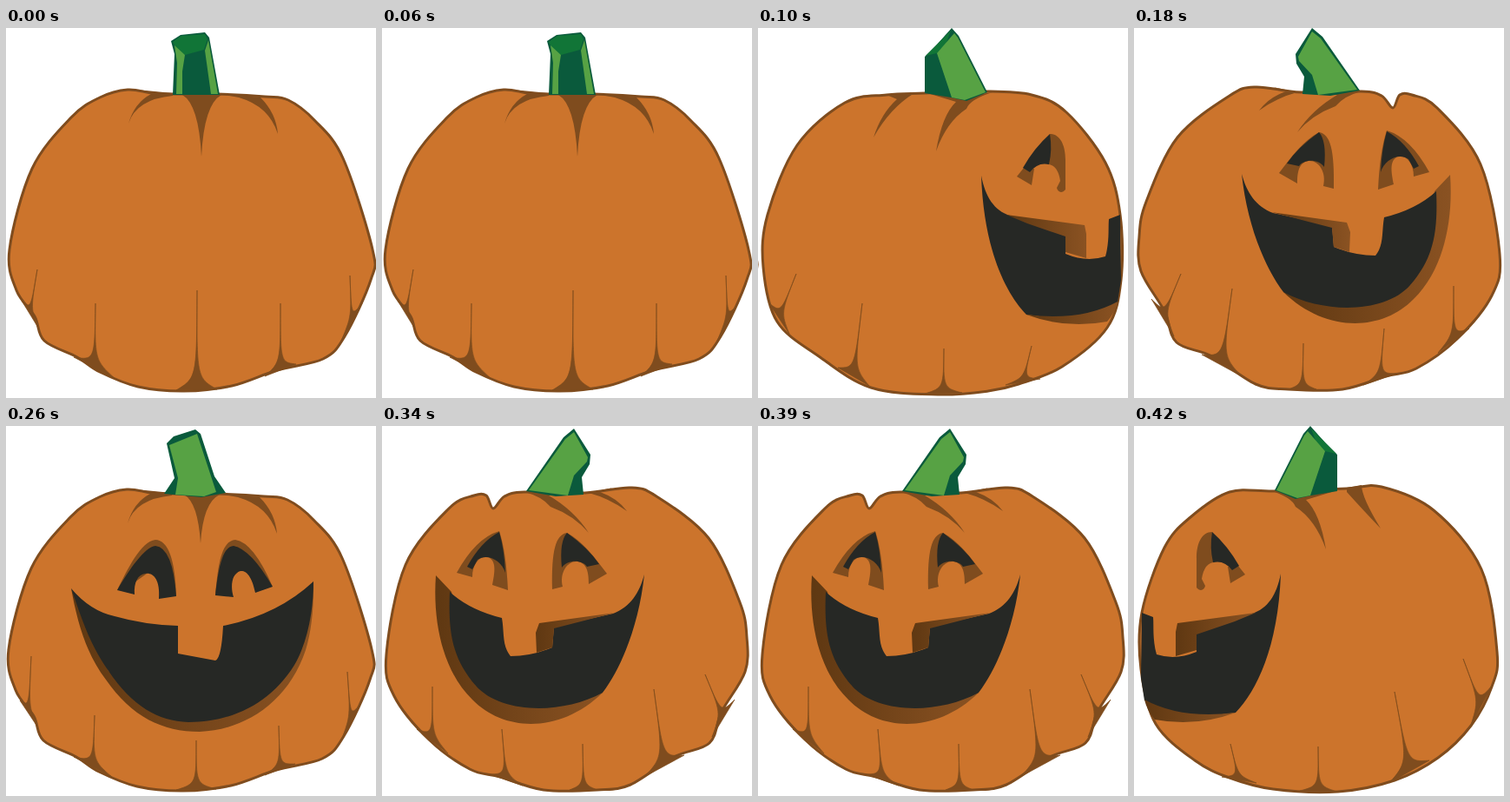
Recreate the animation shown at these times as an HTML page. Size 426 by 426 pixels, loop 500 ms.

```html
<!DOCTYPE html>
<html lang="en">
<head>
<meta charset="utf-8">
<title>Spinning pumpkin</title>
<style>
  html, body { margin: 0; width: 100%; height: 100%; overflow: hidden; background: #fff; }
  svg { display: block; width: 100vw; height: 100vh; --rim: url(#rim); }
  .flip { transform: matrix(-1, 0, 0, 1, 426, 0); --rim: url(#rimFlip); }
  .strip { animation: spin 500ms step-end infinite; }
  @keyframes spin {
    0% { transform: translateX(0); }
    20% { transform: translateX(-426px); }
    36% { transform: translateX(-852px); }
    52% { transform: translateX(-1278px); }
    68% { transform: translateX(-1704px); }
    84%, 100% { transform: translateX(-2130px); }
  }
  .skin { fill: #cc742c; stroke: #7f4c1e; stroke-width: 3; stroke-linejoin: round; }
  .fold { fill: #7f4c1e; stroke: #7f4c1e; stroke-width: .7; }
  .shade { fill: #7f4c1e; }
  .rim { fill: var(--rim); }
  .hole { fill: #262825; }
  .leaf { fill: #57a244; }
  .pine { fill: #0a5a3c; }
  .moss { fill: #117537; }
</style>
</head>
<body>
<svg viewBox="0 0 426 426">
  <defs>
    <linearGradient id="rim">
      <stop offset="0" stop-color="#5f3812"/>
      <stop offset="1" stop-color="#8a5222"/>
    </linearGradient>
    <linearGradient id="rimFlip" href="#rim" x1="1" x2="0"/>

    <g id="front">
      <path class="skin" data-ring="192 76 168 75 140 71 108 80 75 103 30 162 4 255 12 302 33 332 44 360 82 379 108 396 152 413 205 418 260 412 312 394 365 381 390 355 420 290 422 255 388 150 355 106 325 83 298 79 243 76"/>
      <path class="shade" d="M141 110Q150 82 192 78V75L140 70 167 76Q148 86 141 110ZM243 75L293 80Q311 98 313 122 303 90 268 80Z"/>
    </g>

    <g id="turned">
      <path class="skin" data-ring="192 74 140 68 110 78 50 126 14 200 6 240 8 280 35 326 49 362 90 378 140 410 178 416 240 416 290 401 325 392 372 358 412 308 421 260 399 157 349 92 320 77 306 77 298 92 285 78 262 73"/>
      <path class="shade" d="M160 68L188 74Q165 80 144 95 155 80 175 73ZM192 74L234 77Q205 94 188 120 205 100 232 90 242 78 262 73Z"/>
      <path class="fold" data-fold="54 283 20 312 46 355"/>
      <path class="fold" data-fold="113 300 78 376 124 401"/>
      <path class="fold" data-fold="195 363 178 416 210 416"/>
      <path class="fold" data-fold="288 346 264 411 302 398"/>
      <path class="fold" data-fold="368 297 350 374 386 346"/>
      <path class="pine" d="M186 30L205 0 217 10 260 72 226 78 194 76 196 56 187 41Z"/>
      <path class="leaf" d="M189 33L205 4 215 12 257 71 212 77 205 54 190 38Z"/>
      <path class="shade" d="M167 167C182 147 195 130 213 120C226 122 231 140 230 185L218 182C222 165 212 152 201 153C190 155 188 165 188 179Z"/>
      <path class="hole" d="M213 120Q188 138 176 156L190 159C195 151 212 150 219 160Q222 130 213 120Z"/>
      <path class="shade" d="M291 118Q318 126 340 166L322 171C322 155 313 146 304 148C294 152 296 165 299 180L281 186Q283 142 291 118Z"/>
      <path class="hole" d="M291 119Q285 140 284 166C288 152 305 143 316 151L322 162 328 159Q312 130 291 119Z"/>
      <path class="rim" d="M346 188L364 169C368 225 355 280 322 312C285 350 220 351 172 304L318 296Z"/>
      <path class="hole" d="M124 168C130 190 140 205 160 213L228 228 230 252Q254 262 278 262C288 250 285 235 288 218Q325 209 348 188C350 235 345 265 318 296C290 328 220 330 172 304C150 275 130 225 124 168Z"/>
      <path class="rim" d="M158 212L245 224 249 235 248 258 230 252 228 230Z"/>
    </g>

    <g id="side">
      <path class="shade" d="M195 75L230 80 270 74Q244 82 240 93 217 108 205 142 212 100 228 85Z"/>
      <path class="fold" data-fold="214 369 192 421 235 420"/>
      <path class="fold" data-fold="315 366 285 411 325 404"/>
      <path class="pine" d="M192 75V33L206 19 223 0 231 9 264 74 240 84 222 80Z"/>
      <path class="moss" d="M193 32L222 3 217 17 206 29Z"/>
      <path class="leaf" d="M206 29L226 6 230 11 262 74 238 83 223 80Z"/>
      <path class="shade" d="M298 171L306 161 318 162 315 181ZM336 122C348 122 354 135 354 152V186C350 191 345 189 344 184L348 176Q345 157 333 157Z"/>
      <path class="hole" d="M336 122Q318 138 305 161L313 166Q322 154 335 157 339 140 336 122Z"/>
      <path class="hole" d="M257 170C262 195 272 210 290 216L354 234V260Q378 270 400 263C405 245 403 230 404 220L417 215 418 290 414 316Q372 340 309 330C285 305 260 255 257 170Z"/>
      <path class="rim" d="M286 215L376 227 378 237V265L354 258V240L310 225Z"/>
      <path class="rim" d="M309 330Q372 338 414 315 411 328 402 338 355 347 309 330Z"/>
    </g>
  </defs>

  <g class="strip">
    <g>
      <use href="#front"/>
      <path class="shade" d="M203 77Q222 88 225 148 228 88 248 77Z"/>
      <path class="fold" data-fold="36 278 18 314 37 345"/>
      <path class="fold" data-fold="103 317 78 379 126 404"/>
      <path class="fold" data-fold="220 302 196 417 243 416"/>
      <path class="fold" data-fold="316 317 298 401 334 387"/>
      <path class="fold" data-fold="396 285 386 360 410 317"/>
      <path class="pine" d="M190 15L201 8 229 5 234 11 246 77H192L194 30Z"/>
      <path class="moss" d="M192 16L202 9 229 7 232 13 228 25 206 31 195 22Z"/>
      <path class="leaf" d="M194 20L206 31 203 50V76H196L197 40ZM229 26L233 14 244 76H236Z"/>
    </g>

    <g transform="translate(426)">
      <path class="skin" data-ring="192 75 148 77 100 86 45 135 11 215 6 275 22 338 70 378 130 414 207 422 265 418 300 410 350 390 402 345 418 290 417 215 400 155 355 97 315 77 260 73"/>
      <path class="shade" d="M148 77L180 75Q152 92 133 126 142 98 160 82Z"/>
      <path class="fold" data-fold="44 283 12 316 36 352"/>
      <path class="fold" data-fold="120 317 92 391 128 412"/>
      <use href="#side"/>
    </g>

    <use href="#turned" x="852"/>

    <g transform="translate(1278)">
      <use href="#front" x="-1" y="2"/>
      <path class="shade" d="M205 79Q221 88 224 135 227 88 246 79Z"/>
      <path class="fold" data-fold="29 265 16 316 36 346"/>
      <path class="fold" data-fold="102 333 78 381 122 404"/>
      <path class="fold" data-fold="219 362 196 419 242 418"/>
      <path class="fold" data-fold="314 345 298 402 333 389"/>
      <path class="fold" data-fold="393 283 386 362 408 320"/>
      <path class="pine" d="M185 20L193 12 218 4 224 9 240 58 253 77 225 82 182 78 194 60Z"/>
      <path class="leaf" d="M188 22L220 9 242 76 228 81 195 79 198 60Z"/>
      <path class="shade" d="M128 189C140 165 155 133 172 131Q194 132 196 196L176 160 148 180Z"/>
      <path class="hole" d="M128 189C142 165 160 139 172 138Q192 140 196 196L176 199C178 175 168 168 160 170C152 171 147 180 148 194Z"/>
      <path class="shade" d="M241 195C244 160 248 132 264 131Q285 134 307 185L276 160 260 175Z"/>
      <path class="hole" d="M241 195C245 160 250 139 262 138Q282 142 307 185L287 192C283 172 276 166 270 167C260 169 258 185 262 197Z"/>
      <path class="rim" d="M75 187C82 225 92 262 115 292C145 335 180 352 223 352C275 350 325 318 345 258Q355 225 354 178L335 270 210 341 118 282Z"/>
      <path class="hole" d="M75 187Q97 213 125 219 160 229 198 230V262L241 270Q248 268 250 230 312 218 354 179C354 205 350 240 335 270C310 315 265 341 210 341C175 340 145 322 118 282C95 250 85 215 75 187Z"/>
    </g>

    <g transform="translate(1704 3)">
      <use href="#turned" class="flip"/>
    </g>

    <g transform="translate(2130)">
      <path class="skin" data-ring="163 75 110 76 65 105 35 140 9 215 8 280 25 343 70 385 110 405 160 418 235 421 300 408 350 382 388 345 412 300 418 260 400 165 345 97 285 70 245 72"/>
      <path class="shade" d="M245 71L262 68Q262 82 284 118 263 96 245 76Z"/>
      <path class="fold" data-fold="300 306 294 411 340 385"/>
      <path class="fold" data-fold="379 268 387 347 412 299"/>
      <use href="#side" class="flip"/>
    </g>
  </g>
</svg>
<script>
  // Closed smooth curve through a ring of points
  function ring(n) {
    const count = n.length / 2;
    const at = (i, axis) => n[((i + count) % count) * 2 + axis];
    const handle = (i, dir) => [0, 1].map(a => at(i, a) + dir * (at(i + 1, a) - at(i - 1, a)) / 6);
    let d = `M${n[0]} ${n[1]}`;
    for (let i = 0; i < count; i++) {
      d += `C${handle(i, 1)} ${handle(i + 1, -1)} ${at(i + 1, 0)} ${at(i + 1, 1)}`;
    }
    return d + "Z";
  }

  // Thin crease that flares from its tip to two feet on the outline
  function fold([x, y, lx, ly, rx, ry]) {
    const lift = (tip, a, b) => (a + b) / 2 * 0.88 + tip * 0.12;
    const neck = `${lift(x, lx, rx)} ${lift(y, ly, ry)}`;
    return `M${x} ${y}C${neck} ${neck} ${lx} ${ly}L${rx} ${ry}C${neck} ${neck} ${x} ${y}Z`;
  }

  for (const [key, draw] of Object.entries({ ring, fold })) {
    for (const path of document.querySelectorAll(`[data-${key}]`)) {
      path.setAttribute("d", draw(path.dataset[key].split(" ").map(Number)));
    }
  }
</script>
</body>
</html>
```
